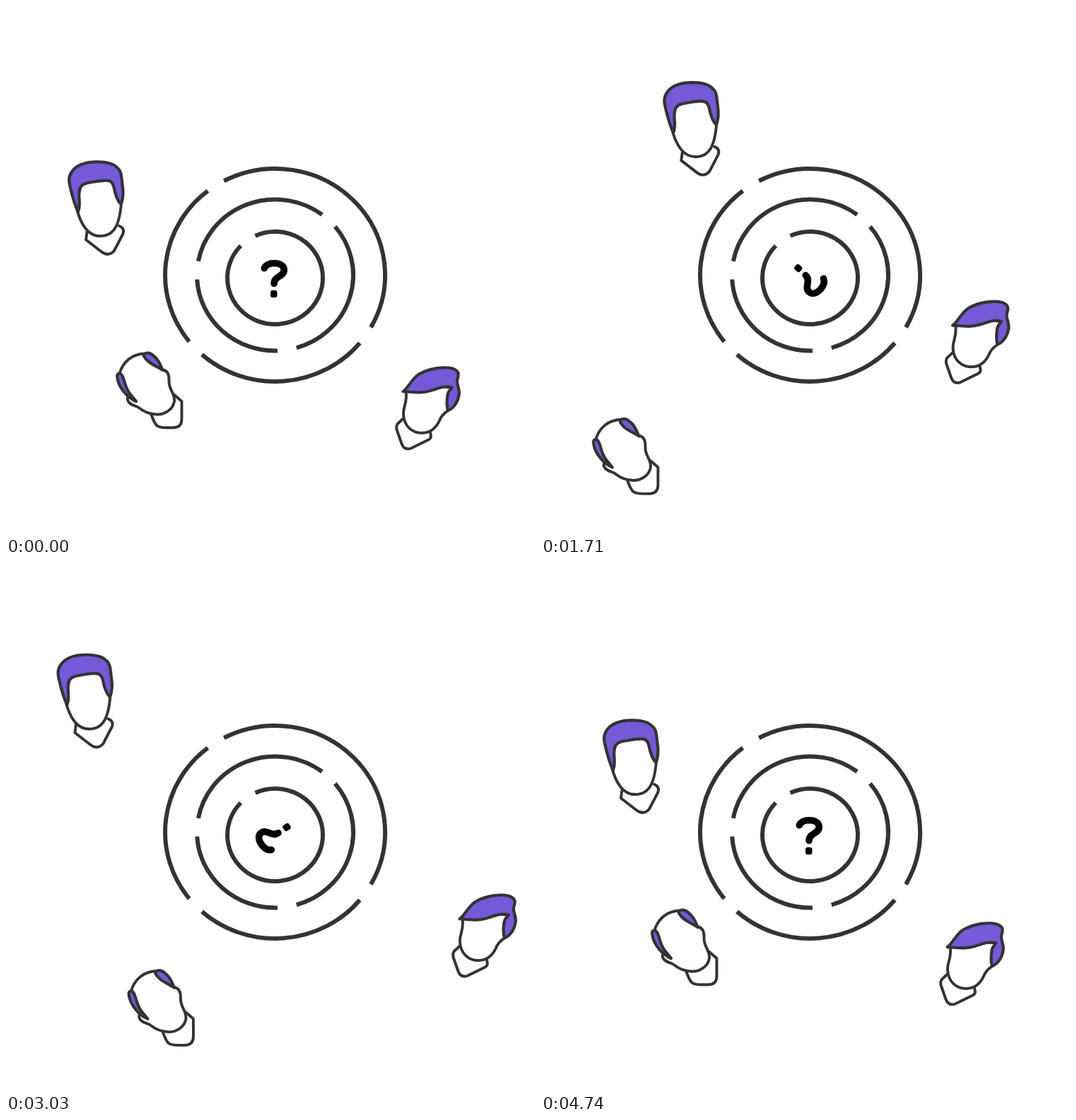
Write an HTML page that moves like this. It is 748 px wide and 748 px high and loops after 4.77 s.

```html
<!DOCTYPE html>
<html lang="en">
<head>
<meta charset="utf-8">
<title>Maze and question</title>
<style>
  html, body { margin: 0; width: 100%; height: 100%; overflow: hidden; background: #fff; }
  svg { display: block; width: 100%; height: 100%; }
  path { stroke: #333335; stroke-linejoin: round; stroke-linecap: round; }
  .skin { fill: #fff; stroke-width: 3.9; }
  .hair { fill: #7559d6; stroke-width: 4.2; }
  #rings path { fill: none; stroke-width: 6; stroke-linecap: butt; }
  #mark path { fill: none; stroke: #000; stroke-width: 9.6; }
</style>
</head>
<body>
<svg viewBox="0 0 748 748">
  <g id="rings"></g>

  <g id="mark" role="img" aria-label="?">
    <path d="M365.3 370.8C367.5 366 372 363.8 379 363.8C388 363.8 393.2 367.5 393.2 373.2C393.2 383 379 381.5 379 392.6"/>
    <rect x="374" y="402" width="9.4" height="10.2" rx="3"/>
  </g>

  <g id="tall">
    <path class="skin" d="M115 316L113 330.500L135 347.500Q145 355 153 346L165.500 322Q168 314 160 311"/>
    <path class="skin" d="M99 283C105 308 115 325.300 133 325.300C154 325.300 161.500 308 163.500 272L150 240L108 244Z"/>
    <path class="hair" d="M102 291C97 281 94 270 91 257C88 246 88.500 240 94 233C101 224 112 220.300 129 220.300C146 220.300 154 224 160 231.500C164 237 163 243 164.500 252C166.500 265 166 272 162.500 280C156 274 154 264 152.500 256C150 247 146 246.500 139 246.800C130 247 122 249 114 250.500C104 253 102.500 260 103.500 272C104.500 282 103.500 287 102 291Z"/>
  </g>

  <g id="bald">
    <path class="skin" d="M204 574C207 582 209 589 213 593Q217 596.300 227 596.300L236 596.300C245 596.300 248.500 592 248.500 584L248.500 559L237 549"/>
    <path class="skin" d="M160 522C164 503 179 491.500 197 491.500C210 493 217 503 220.500 514C228 515 231 520 230.500 530C230 543 239 547 238 559C236 571 224 578 213 577.500C203 577 197 575 190 569.500C184 564 178 566 173.500 560C169.500 555 173 551 177 551C168 543 159 533 160 522Z"/>
    <path class="hair" d="M157.500 526C156 519 161.500 517.500 164.500 523C168.500 531 168 539 175 548L184 559C172 554 159.500 540 157.500 526Z"/>
    <path class="hair" d="M195 495C193.500 490.500 202 488.500 208 494C216 500 218 507 221.500 515C212 508.500 200 505 195 495Z"/>
  </g>

  <g id="quiff">
    <path class="skin" d="M562 583L553.500 591Q551.500 594 552.500 599L559.500 619Q563 628.500 572.500 625.500L598 613Q601.500 611 600.700 607L599 598"/>
    <path class="skin" d="M565.500 545C568 561 561 567 562 578C563 594 574 603.700 588 603.700C600 603.700 608 597 613 586C616 578 621 575 625 572L632 540L600 535Z"/>
    <path class="hair" d="M561.500 545C570 539 574 526 585 520C600 512 620 509.500 631 512.500C641 516 640.500 521 638.500 527C635.500 534 642.500 541 640.500 550C639 560 633 569 625 572C622.500 565 623.500 556 624.500 549C626 544 628 543 630.500 539.500C620 536 610 541 600 544C585 548.500 575 545.500 561.500 545Z"/>
  </g>
</svg>
<script>
const LOOP = 4770, STEP = 30, TURN = 2580, SPIN = 4650;
const $ = id => document.getElementById(id);

function newPath(d) {
  const p = document.createElementNS("http://www.w3.org/2000/svg", "path");
  p.setAttribute("d", d);
  return p;
}

// Part of an ellipse between two angles in degrees
function arc(cx, cy, rx, ry, from, to) {
  const at = deg => {
    const a = deg * Math.PI / 180;
    return `${cx + rx * Math.cos(a)} ${cy + ry * Math.sin(a)}`;
  };
  return `M${at(from)}A${rx} ${ry} 0 ${to - from > 180 ? 1 : 0} 1 ${at(to)}`;
}

function ring(cy, rx, ry, ...spans) {
  for (const [from, to] of spans) $("rings").append(newPath(arc(380.5, cy, rx, ry, from, to)));
}

ring(380.5, 155.5, 150.5, [242.3, 389.4], [39.6, 131.7], [141.3, 232.3]);
ring(380.5, 110.5, 107, [190.6, 307], [-39.9, 74.1], [88.2, 176.7]);
ring(384.5, 67.5, 65.5, [245.5, 584]);

// Each head strolls at an even pace along one curve, then along a second one until its end time
function walk(id, end, out, back) {
  const legs = [out, back].map(newPath);
  const lengths = legs.map(leg => leg.getTotalLength());
  return t => {
    const i = t < TURN ? 0 : 1;
    const u = i ? Math.min(1, (t - TURN) / (end - TURN)) : t / TURN;
    const p = legs[i].getPointAtLength(u * lengths[i]);
    $(id).setAttribute("transform", `translate(${p.x} ${p.y})`);
  };
}

const walks = [
  walk("tall", 4090,
    "M0 0C35 -25 75 -56 102 -81C122 -100 104 -108 43.500 -125C28 -128.500 8 -129 -3 -126.500",
    "M-3 -126.500C-16 -119 -20 -96 -10 -51L0 2"),
  walk("bald", 4740,
    "M0 0C-22 1 -50 1 -64 9S-90 33 -89.500 51.500C-93 76 -88 105 -52.500 113.500C-38 117 -25 115 -10 107.500",
    "M-10 107.500C8 98 24 77 36.500 61.500C58 32 60 4 0 0"),
  walk("quiff", 4740,
    "M0 0C1 -20 1 -48 5 -74C7 -97 22 -99 39 -83.500L60.500 -61.500",
    "M60.500 -61.500C82 -40 100 -25 82 -13C68 -4 45 -1 13 -2")
];

function draw(now) {
  const t = Math.floor(now % LOOP / STEP) * STEP;
  walks.forEach(move => move(t));
  $("mark").setAttribute("transform", `rotate(${360 * Math.min(1, t / SPIN)} 379.2 385.6)`);
}

let start;
function tick(now) {
  start ??= now;
  draw(now - start);
  requestAnimationFrame(tick);
}
draw(0);
requestAnimationFrame(tick);
</script>
</body>
</html>
```
